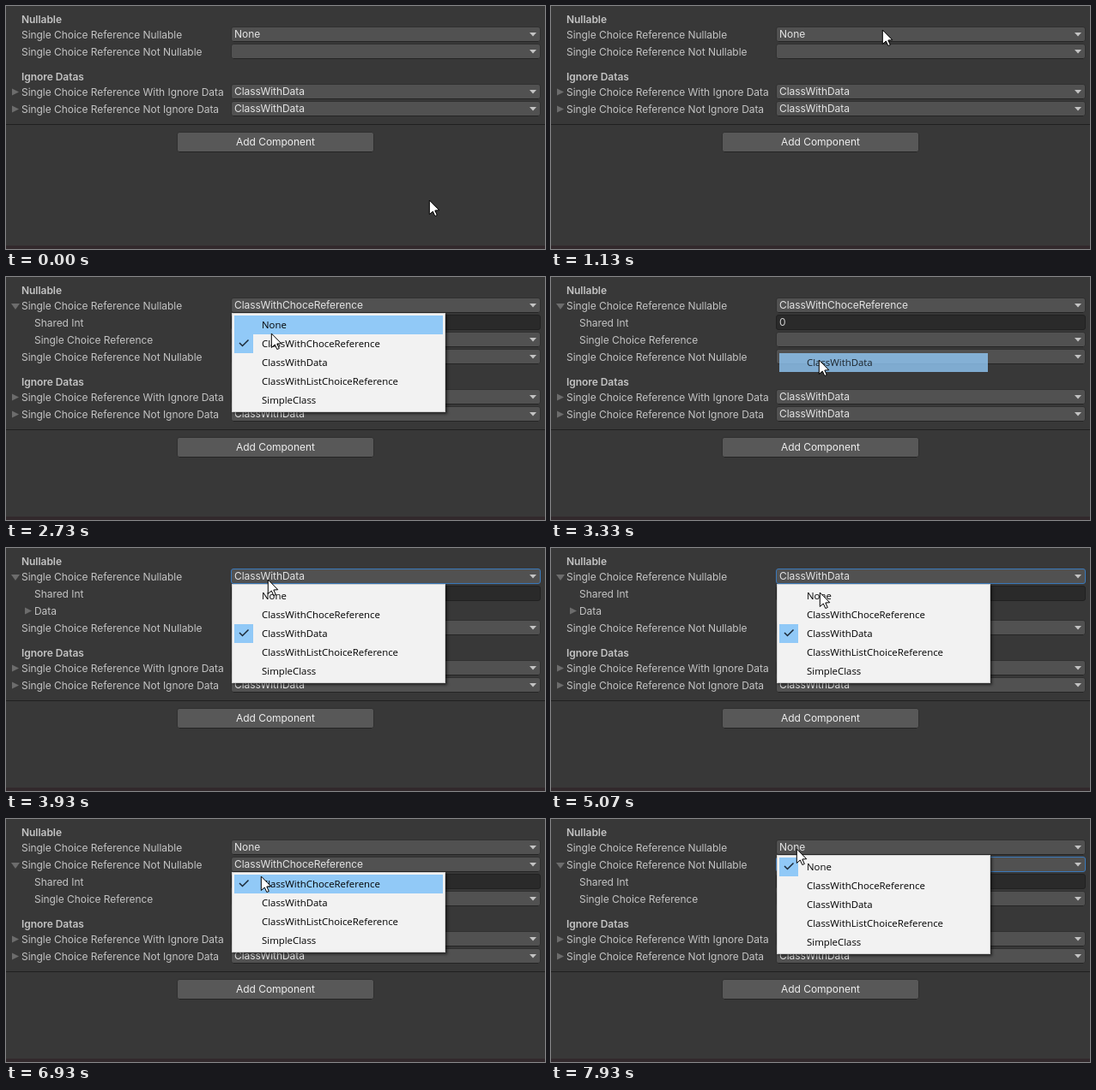
Animation of 628 by 284 pixels, one loop 8000 ms. Source, as an HTML page with a canvas:

```html
<!DOCTYPE html>
<html lang="en">
<head>
<meta charset="utf-8">
<style>
  html, body { margin: 0; width: 100%; height: 100%; overflow: hidden; background: #383838; }
  canvas { display: block; }
</style>
</head>
<body>
<canvas id="stage" width="628" height="284"></canvas>
<script>
const ctx = document.getElementById('stage').getContext('2d');
const LOOP = 8000, STEP = 200 / 3;
const UI = '12px Inter, sans-serif', BOLD = '600 12px Inter, sans-serif';
const MENU = '11.4px "Open Sans", sans-serif';
const CHOICE = 'ClassWithChoceReference', DATA = 'ClassWithData';
const CLASSES = [CHOICE, DATA, 'ClassWithListChoiceReference', 'SimpleClass'];
const OPTIONS = [['None', ...CLASSES], CLASSES];
const ROW = 22, FADE = 270, SETTLE = 140;

// Each menu visit: field, opening and click times, pointer tip at both, picked value
const menus = [
  { owner: 0, open: 1200, from: [386, 28], click: 1930, to: [337, 79], pick: CHOICE },
  { owner: 0, open: 2530, from: [306, 33], click: 3270, to: [312, 97], pick: DATA },
  { owner: 0, open: 3930, from: [305, 37], click: 5070, to: [313, 52], pick: 'None' },
  { owner: 1, open: 5530, from: [300, 56], click: 6070, to: [302, 84], pick: CHOICE },
  { owner: 1, open: 6730, from: [303, 57], click: 7800, to: [286, 35] },
  { owner: 0, open: 7930, from: [286, 35], click: LOOP, to: [286, 35] }
];

const stops = [
  { at: 0, tip: [493, 227] },
  { at: 200, tip: [493, 217] },
  ...menus.flatMap(m => [
    { at: m.open, tip: m.from },
    { at: m.click, tip: m.to, browse: m.click - m.open > 1000 ? 30 : 0 }
  ])
];

function rect(x, y, w, h, color) {
  ctx.fillStyle = color;
  ctx.fillRect(x, y, w, h);
}

function polygon(points, color) {
  ctx.beginPath();
  points.forEach(([x, y]) => ctx.lineTo(x, y));
  ctx.closePath();
  ctx.fillStyle = color;
  ctx.fill();
}

function text(str, x, y, color = '#c4c4c4', font = UI) {
  ctx.font = font;
  ctx.letterSpacing = font === MENU ? '0px' : '-0.05px';
  ctx.fillStyle = color;
  ctx.fillText(str, x, y);
}

function box(x, y, w, h, fill, border, bottom = border) {
  ctx.beginPath();
  ctx.roundRect(x + 0.5, y + 0.5, w - 1, h - 1, 2.5);
  ctx.fillStyle = fill;
  ctx.fill();
  ctx.strokeStyle = border;
  ctx.lineWidth = 1;
  ctx.stroke();
  rect(x + 3, y + h - 1, w - 6, 1, bottom);
}

function dropdown(y, value, focused) {
  box(262, y, 361, 18, '#515151', ...(focused ? ['#3a79bb'] : ['#303030', '#242424']));
  text(value, 266, y + 13, '#e4e4e4');
  polygon([[610, y + 7], [618, y + 7], [614, y + 11.5]], '#c4c4c4');
}

function foldout(x, y, open) {
  polygon(open ? [[x - 5, y - 3], [x + 5, y - 3], [x, y + 4]]
               : [[x - 4, y - 4], [x + 4, y], [x - 4, y + 4]], '#6c6c6c');
}

function children(y, value) {
  text('Shared Int', 33, y + 14);
  box(262, y, 361, 18, '#2a2a2a', '#212121');
  text('0', 266, y + 13, '#d2d2d2');
  if (value === DATA) {
    foldout(26, y + 29.5, false);
    text('Data', 33, y + 34);
  } else {
    text('Single Choice Reference', 33, y + 34);
    dropdown(y + 20, '');
  }
}

function inspector(state) {
  rect(0, 0, 628, 284, '#383838');
  text('Nullable', 18, 20, '#c4c4c4', BOLD);
  const fieldTops = [];
  let y = 24;
  ['Nullable', 'Not Nullable'].forEach((name, i) => {
    const value = state.values[i], expanded = CLASSES.includes(value);
    fieldTops.push(y);
    if (expanded) foldout(11, y + 10, true);
    text('Single Choice Reference ' + name, 18, y + 14);
    dropdown(y, value, state.focus === i);
    y += 20;
    if (expanded) {
      children(y, value);
      y += 40;
    }
  });
  text('Ignore Datas', 18, y + 23, '#c4c4c4', BOLD);
  y += 27;
  for (const name of ['With', 'Not']) {
    foldout(11, y + 9.5, false);
    text(`Single Choice Reference ${name} Ignore Data`, 18, y + 14);
    dropdown(y, DATA);
    y += 20;
  }
  rect(0, y + 7, 628, 1, '#1f1f1f');
  box(199, y + 16, 230, 24, '#585858', '#303030', '#242424');
  ctx.textAlign = 'center';
  text('Add Component', 314, y + 32, '#eeeeee');
  ctx.textAlign = 'left';
  rect(0, 280, 628, 4, '#32292c');
  return fieldTops;
}

function menuRow(label, y, highlighted) {
  if (highlighted) rect(266, y, 243, ROW, '#91c9f7');
  text(label, 298, y + 15, '#000', MENU);
}

function checkMark(y) {
  rect(266, y, ROW, ROW, '#91c9f7');
  ctx.beginPath();
  ctx.moveTo(272, y + 10);
  ctx.lineTo(275.5, y + 13.5);
  ctx.lineTo(282.5, y + 6.5);
  ctx.strokeStyle = '#1c2a38';
  ctx.lineWidth = 1.5;
  ctx.stroke();
}

// After a click the menu vanishes and only the picked row fades out
function drawMenu(menu, top, value, tipY, t) {
  const items = OPTIONS[menu.owner], first = top + 3;
  const fadeAge = t - menu.click - STEP;
  if (fadeAge > -10) {
    ctx.globalAlpha = Math.min(0.8, 0.8 * (1 - fadeAge / FADE));
    menuRow(menu.pick, first + items.indexOf(menu.pick) * ROW, true);
    ctx.globalAlpha = 1;
    return;
  }
  const height = items.length * ROW + 6;
  ctx.save();
  ctx.shadowColor = 'rgba(0,0,0,.55)';
  ctx.shadowBlur = 3;
  ctx.shadowOffsetX = ctx.shadowOffsetY = 2;
  rect(263, top, 249, height, '#cccccc');
  ctx.restore();
  rect(264, top + 1, 247, height - 2, '#f2f2f2');
  items.forEach((label, i) => {
    const y = first + i * ROW;
    menuRow(label, y, t < menu.click && tipY >= y && tipY < y + ROW);
    if (label === value) checkMark(y);
  });
}

// The pointer leaves each stop after a beat and glides to the next ahead of time
function pointerAt(t) {
  const next = stops.findIndex(s => s.at > t);
  const a = stops[next - 1], b = stops[next];
  const leave = a.at + 70;
  const p = Math.max(0, Math.min(1, (t - leave) / (0.65 * (b.at - leave))));
  const ease = p * (2 - p);
  const dip = (b.browse || 0) * Math.sin(Math.PI * p);
  const [x, y] = a.tip.map((v, i) => Math.round(v + (b.tip[i] - v) * ease));
  return [x, y + Math.round(dip)];
}

function drawPointer([x, y]) {
  const shape = [[0, 0], [0, 16.5], [4, 13], [6.5, 18.5], [9, 17.5], [6.5, 12], [11.5, 11.7]];
  polygon(shape.map(([dx, dy]) => [x + 0.3 + dx, y + dy]), '#fff');
  ctx.strokeStyle = '#000';
  ctx.lineWidth = 1;
  ctx.stroke();
}

// Replays finished menu visits; a field that stays filled keeps the focus
function stateAt(t) {
  const state = { values: ['None', ''], focus: -1 };
  for (const { owner, click, pick } of menus) {
    if (t < click + (pick ? SETTLE - 10 : 0)) break;
    const before = state.values[owner], after = pick || before;
    state.values[owner] = after;
    state.focus = CLASSES.includes(before) && CLASSES.includes(after) ? owner : -1;
  }
  return state;
}

function render(now) {
  const t = Math.round(Math.floor((now % LOOP + 4) / STEP) * STEP / 10) * 10 % LOOP;
  const state = stateAt(t), tip = pointerAt(t);
  const tops = inspector(state);
  const menu = menus.find(m => t >= m.open && t < m.click + (m.pick ? STEP + FADE : 0));
  if (menu) drawMenu(menu, tops[menu.owner] + 18, state.values[menu.owner], tip[1], t);
  drawPointer(tip);
}

const start = performance.now();
function tick() {
  render(performance.now() - start);
  requestAnimationFrame(tick);
}
tick();
</script>
</body>
</html>
```
